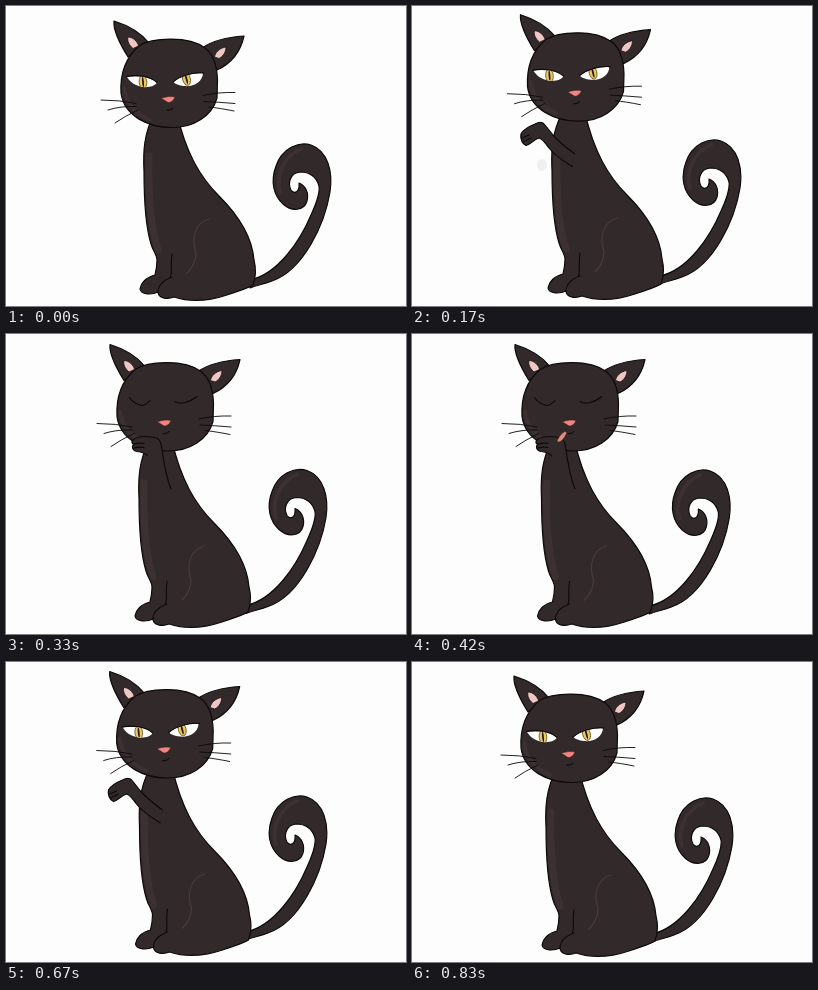
Animation of 400x300 px, one loop 0.91 s. Source, as an HTML page without scripts:

```html
<!DOCTYPE html>
<html lang="en">
<head>
<meta charset="utf-8">
<title>Cat washing its paw</title>
<style>
  html, body { margin: 0; width: 100%; height: 100%; overflow: hidden; background: #fdfdfd; }
  svg { display: block; width: 100%; height: 100%; animation: wash 910ms step-end infinite; }

  .fur { fill: #32292a; stroke: #0d0909; stroke-width: 1.2; stroke-linejoin: round; }
  .line { fill: none; stroke: #0d0909; stroke-width: 1.1; stroke-linecap: round; }
  .whiskers { stroke-width: .9; }
  .sheen { fill: none; stroke: #483b3b; stroke-width: 1.2; stroke-linecap: round; }
  .glow { fill: none; stroke: #3c3132; stroke-width: 7; stroke-linecap: round; }
  .thin { stroke-width: 4; }
  .ear { fill: #eec6c4; stroke: #1a1212; stroke-width: .8; }
  .white { fill: #fff; }
  .iris { fill: #e6c866; stroke: #6b4d16; stroke-width: .8; }
  .pupil { fill: #2a1a10; }
  .pink { fill: #ee8583; stroke: #3a1a1a; stroke-width: .6; }

  .head { transform: translate(var(--head)); }
  .body { transform: translate(var(--body)); }
  .tail { transform: translate(var(--tail)); }
  .reach { transform: translate(var(--body)) var(--swing); transform-origin: 160px 157px; opacity: var(--reach); }
  .raised { transform: translate(var(--paw)); opacity: var(--raised); }
  .smudge { opacity: var(--smudge); }
  .open { opacity: calc(1 - var(--shut)); }
  .shut { opacity: var(--shut); }
  .tongue { fill: #dd8c84; opacity: var(--lick); }

  svg {
    --head: 0px, 0px; --body: 0px, 0px; --tail: 0px, 0px; --paw: 0px, 0px;
    --swing: rotate(0deg); --reach: 0; --raised: 0; --shut: 0; --lick: 0; --smudge: 0;
  }
  @keyframes wash {
    0%, 100% { --head: 0px, 0px; --body: 0px, 0px; --tail: 0px, 0px; --reach: 0; --raised: 0; --shut: 0; --lick: 0; --smudge: 0; --paw: 0px, 0px; --swing: rotate(0deg); }
    8.79%  { --head: 0px, -3px; --body: 1px, -.5px; --tail: 2px, -2px; --reach: 1; --raised: 0; --shut: 0; --lick: 0; --smudge: 0; --paw: 0px, 0px; --swing: rotate(-40deg) scale(.8); }
    18.68% { --head: .5px, -6.3px; --body: 2px, -1px; --tail: 4px, -4px; --reach: 1; --raised: 0; --shut: 0; --lick: 0; --smudge: 1; --paw: 0px, 0px; --swing: rotate(0deg); }
    27.47% { --head: -2.5px, -4.5px; --body: -1.5px, -1px; --tail: -1px, -3px; --reach: 0; --raised: 1; --shut: 0; --lick: 0; --smudge: 0; --paw: 0px, 0px; --swing: rotate(0deg); }
    36.26% { --head: -4px, -4.5px; --body: -5px, -1px; --tail: -4px, -2.5px; --reach: 0; --raised: 1; --shut: 1; --lick: 0; --smudge: 0; --paw: -2px, 0px; --swing: rotate(0deg); }
    46.15% { --head: -5px, -4.5px; --body: -8.5px, -1px; --tail: -6.7px, -2px; --reach: 0; --raised: 1; --shut: 1; --lick: 1; --smudge: 0; --paw: -4px, 0px; --swing: rotate(0deg); }
    54.94% { --head: -5.5px, -4px; --body: -7.5px, -1px; --tail: -6.5px, -2px; --reach: 0; --raised: 1; --shut: 1; --lick: 1; --smudge: 0; --paw: -4px, 0px; --swing: rotate(0deg); }
    63.73% { --head: -6px, -3.7px; --body: -6.5px, -1px; --tail: -6.3px, -2.7px; --reach: 0; --raised: 1; --shut: 0; --lick: 0; --smudge: 0; --paw: -4px, 0px; --swing: rotate(0deg); }
    73.62% { --head: -4.3px, -5.5px; --body: -4.5px, -1px; --tail: -4px, -4px; --reach: 1; --raised: 0; --shut: 0; --lick: 0; --smudge: 0; --paw: 0px, 0px; --swing: rotate(0deg); }
    82.41% { --head: -5px, -3px; --body: -4.3px, -.5px; --tail: -4px, -3px; --reach: 1; --raised: 0; --shut: 0; --lick: 0; --smudge: 0; --paw: 0px, 0px; --swing: rotate(-40deg) scale(.8); }
    91.2%  { --head: -6px, -1px; --body: -4px, 0px; --tail: -4px, -2px; --reach: 0; --raised: 0; --shut: 0; --lick: 0; --smudge: 0; --paw: 0px, 0px; --swing: rotate(0deg); }
  }
</style>
</head>
<body>
<svg viewBox="0 0 400 300">
  <defs>
    <clipPath id="leftEye"><path d="M121 71C131 69 144 70.500 151 76.500C147 83 129 84 121 71Z"/></clipPath>
    <clipPath id="rightEye"><path d="M167.500 76C174 70 188 66.500 197 67.500C196 76 188 81 178 80C173 79.500 169 78 167.500 76Z"/></clipPath>
    <g id="iris">
      <ellipse class="iris" rx="3.800" ry="6.500"/>
      <ellipse class="pupil" rx=".9" ry="5"/>
    </g>
  </defs>

  <ellipse class="smudge" cx="130" cy="159" rx="5" ry="6" fill="#efefef"/>

  <g class="tail">
    <path class="fur" d="M244 274C272 268 294 235 305 209C311 196 314 186 313 180C310 170 303 166 294 166C285 167 281 176 285 184C288 188 294 187 293 177C300 180 303 187 301 195C298 205 286 206 277 198C268 190 264 176 270 160C276 142 293 135 305 139C322 145 327 166 324 186C319 217 298 264 266 275C258 278 252 279 244 282Z"/>
    <path class="glow thin" d="M274 186C269 172 277 150 295 143"/>
  </g>

  <g class="body">
    <path class="fur" d="M148 108C138 128 137 145 138 165C138 195 140 222 145 238C147 245 151 249 151 254C151 260 150 265 149 269C140 271 135 277 134 283C135 289 146 289 152 286C152 292 161 294 168 291C186 297 206 294 221 289C231 285 241 283 247 279C250 271 250 262 248 254C246 229 230 207 213 190C194 171 180 147 171 108Z"/>
    <path class="glow" d="M143 150C142 190 145 222 152 244"/>
    <path class="sheen" d="M203 213C189 217 185 232 190 247C190 256 186 262 181 267"/>
    <path class="line" d="M152 286C152 279 158 274 166 271M166 248C164 260 167 266 164 272"/>
  </g>

  <g class="head">
    <path class="fur" d="M122 51C114 38 107 24 108 15C121 19 135 27 143 37Z"/>
    <path class="fur" d="M196 42C206 35 222 31 238 30C235 44 226 57 211 64Z"/>
    <path class="fur" d="M133 40C145 32 182 29 199 42C207 48 211 58 211.500 74L211 92C206 110 188 121.500 166 121.500C142 121.500 118 110 115 87C114 68 119 52 133 40Z"/>
    <path class="glow thin" d="M118 82C120 97 130 108 144 114"/>
    <path class="ear" d="M122 31C127 31 132 36 132.500 40L127 42.500C123 39 121 35 122 31Z"/>
    <path class="ear" d="M220 41C213 42 209 47 208.500 51L213 52.500C218 50 220 45 220 41Z"/>

    <g class="open">
      <g clip-path="url(#leftEye)">
        <rect class="white" x="118" y="62" width="36" height="24"/>
        <use href="#iris" transform="translate(137 76) rotate(-5)"/>
      </g>
      <g clip-path="url(#rightEye)">
        <rect class="white" x="164" y="62" width="36" height="22"/>
        <use href="#iris" transform="translate(180.500 73) rotate(-14)"/>
      </g>
      <path class="line" d="M120 70.500C131 68.500 144 70 151 76.500M167 76C174 69.500 188 66 198 67"/>
    </g>
    <path class="line shut" d="M127.500 68C131 74 136 74.500 139 76Q144 76 148 71M173 72C177 75 186 74 195 67"/>

    <path class="pink" d="M155 92.500C160 90.500 165 90 169 91C168 94 165 97 162 96.500C160 95.500 158 93.500 155 92.500Z"/>
    <path class="line" d="M161 104Q165 104.500 167 102"/>
    <path class="line whiskers" d="M95 94Q114 94 130 97.500M102 104Q114 100 130 100.500M109 117Q119 110 132 104M197 89.500Q212 86 229 86.500M198 95.500Q212 96 229 97.500M203 101Q213 102 228 105"/>
  </g>

  <g class="reach">
    <path class="fur" d="M161 149C154 144 146 138 139 130L131 120C129 117 125 117 121 119C116 121 109 125 107 129C106 133 108 139 112 140.500C116 140 119 135 125 133C129 134 131 138 135 143C141 151 149 156 159 162"/>
    <path class="line" d="M108 133L115 130M109 137L117 133"/>
  </g>

  <g class="raised">
    <path class="fur" d="M167 155C162 143 160 130 158 116C157 106 155 104 148 103C140 102 132 103 129 106C127 108 128 110 130 110C127 113 129 117 133 117.500C138 118 141 119 144 122"/>
    <path class="line" d="M130 110Q135 108.500 140 109.500M130 114Q135 112.500 140 113.500"/>
  </g>

  <g class="head">
    <path class="pink tongue" d="M158 102C155 103 151 108 150 112C153 114 157 110 160 103Z"/>
  </g>
</svg>
</body>
</html>
```
